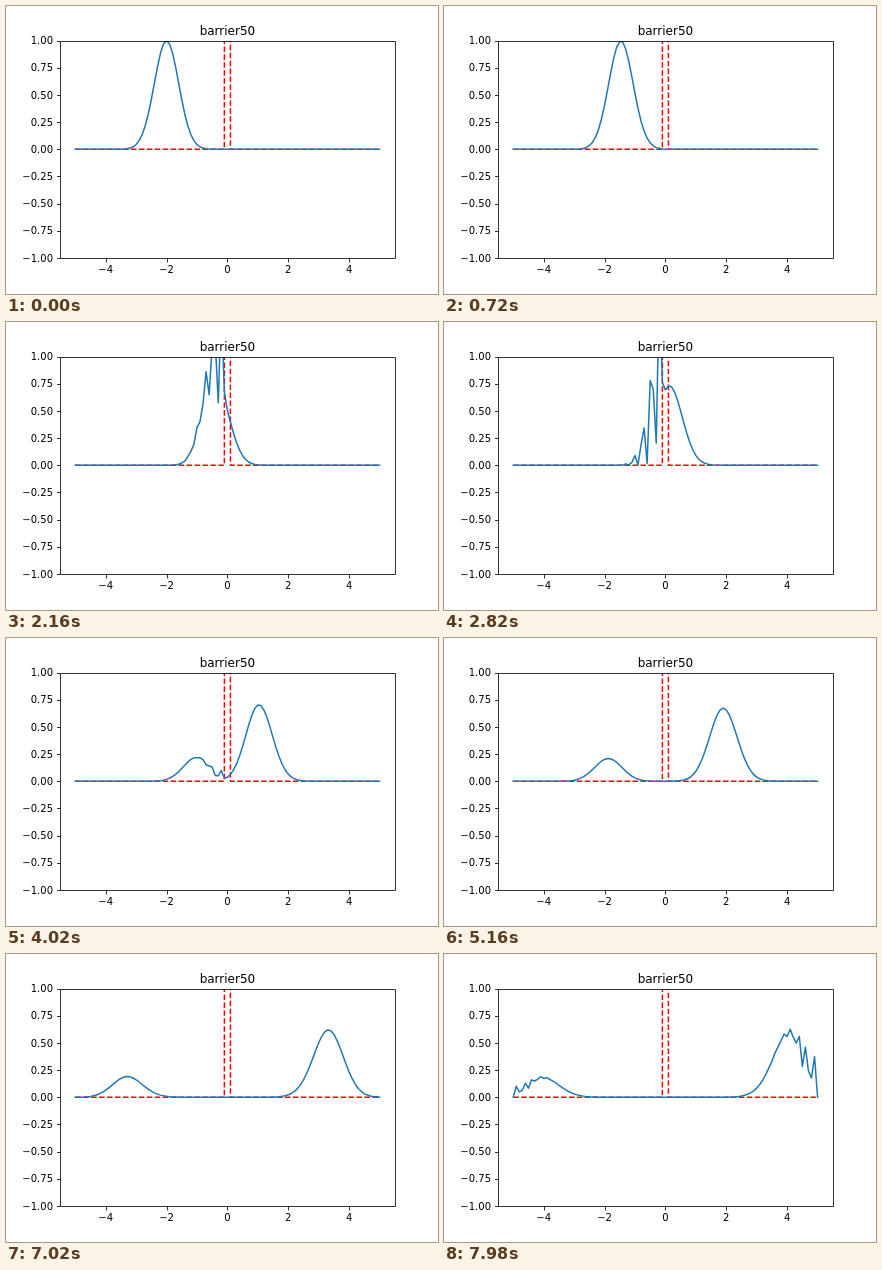
Animation, 432 px wide and 288 px high, one loop 8 s. Source, as an HTML page:

```html
<!DOCTYPE html>
<html lang="en">
<head>
<meta charset="utf-8">
<title>Wave packet and barrier</title>
<style>
  html, body { margin: 0; width: 100%; height: 100%; overflow: hidden; background: #fff; }
  svg { display: block; width: 100%; height: 100%; }
  text { font: 10px "DejaVu Sans", sans-serif; fill: #000; }
  .title { font-size: 12px; }
  .axis { fill: none; stroke: #000; stroke-width: .8; }
  .line { fill: none; stroke-width: 1.5; stroke-linejoin: round; }
</style>
</head>
<body>
<svg viewBox="0 0 432 288">
  <clipPath id="plot"><rect x="54" y="35" width="335" height="217"/></clipPath>
  <g clip-path="url(#plot)">
    <path id="barrier" class="line" stroke="#f00" stroke-dasharray="5.55 2.4"/>
    <path id="density" class="line" stroke="#1f77b4" stroke-linecap="square"/>
  </g>
  <path id="axes" class="axis"/>
  <g id="labels"></g>
</svg>
<script>
const LOOP = 8000, STEP = 60;
const POINTS = 101, DX = 0.1, DT = 0.005, SUBSTEPS = 5;
const START = -2, SIGMA = 0.4, WAVE_NUMBER = 20, HEIGHT = 50;

const $ = id => document.getElementById(id);
const px = x => 221.4 + 30.4364 * x;
const py = y => 143.28 - 108.72 * y;
const snap = v => Math.floor(v + 0.5) + 0.5;
const gridX = i => (i - (POINTS - 1) / 2) * DX;

function addText(x, y, text, anchor, className = '') {
  const node = document.createElementNS('http://www.w3.org/2000/svg', 'text');
  node.setAttribute('x', x);
  node.setAttribute('y', y);
  node.setAttribute('text-anchor', anchor);
  node.setAttribute('class', className);
  node.textContent = text;
  $('labels').append(node);
}

function drawAxes() {
  let path = 'M54.5 35.5H389.5V252.5H54.5Z';
  const label = (v, digits) => v.toFixed(digits).replace('-', '\u2212');
  for (let x = -4; x <= 4; x += 2) {
    path += `M${snap(px(x))} 252.5v4`;
    addText(px(x), 267, label(x, 0), 'middle');
  }
  for (let y = -1; y <= 1; y += 0.25) {
    path += `M54.5 ${snap(py(y))}h-3.5`;
    addText(47, Math.round(py(y) + 3.6), label(y, 2), 'end');
  }
  $('axes').setAttribute('d', path);
  addText(px(0), 29, 'barrier50', 'middle', 'title');
}

// The barrier occupies one grid point, so its sides leave the plot almost vertically.
function drawBarrier() {
  const lean = 0.08, base = py(0);
  $('barrier').setAttribute('d',
    `M${px(-5)} ${base}H${px(-DX)}L${px(-DX) + lean} -1` +
    `M${px(DX) - lean} -1L${px(DX)} ${base}H${px(5)}`);
}

// Schrödinger equation: d(re)/dt = H im, d(im)/dt = -H re, with fixed ends.
function hamiltonian(f, i) {
  const kinetic = (2 * f[i] - f[i - 1] - f[i + 1]) / (2 * DX * DX);
  return kinetic + (i === (POINTS - 1) / 2 ? HEIGHT * f[i] : 0);
}

function slope({ re, im }) {
  const out = { re: new Float64Array(POINTS), im: new Float64Array(POINTS) };
  for (let i = 1; i < POINTS - 1; i++) {
    out.re[i] = hamiltonian(im, i);
    out.im[i] = -hamiltonian(re, i);
  }
  return out;
}

const add = (a, b, h) => ({
  re: a.re.map((v, i) => v + h * b.re[i]),
  im: a.im.map((v, i) => v + h * b.im[i])
});

function rungeKutta(psi, h) {
  const a = slope(psi);
  const b = slope(add(psi, a, h / 2));
  const c = slope(add(psi, b, h / 2));
  const d = slope(add(psi, c, h));
  return add(add(add(add(psi, a, h / 6), b, h / 3), c, h / 3), d, h / 6);
}

function wavePacket() {
  const psi = { re: new Float64Array(POINTS), im: new Float64Array(POINTS) };
  for (let i = 1; i < POINTS - 1; i++) {
    const x = gridX(i);
    const size = Math.exp(-((x - START) ** 2) / (4 * SIGMA * SIGMA));
    psi.re[i] = size * Math.cos(WAVE_NUMBER * x);
    psi.im[i] = size * Math.sin(WAVE_NUMBER * x);
  }
  return psi;
}

function densityPath({ re, im }) {
  const points = Array.from(re, (v, i) =>
    `${px(gridX(i)).toFixed(2)} ${py(v * v + im[i] * im[i]).toFixed(2)}`);
  return 'M' + points.join('L');
}

function simulate() {
  const paths = [];
  let psi = wavePacket();
  for (let n = 0; n < Math.ceil(LOOP / STEP); n++) {
    paths.push(densityPath(psi));
    for (let s = 0; s < SUBSTEPS; s++) psi = rungeKutta(psi, DT / SUBSTEPS);
  }
  return paths;
}

drawAxes();
drawBarrier();
const paths = simulate();
const begin = performance.now();
let shown = -1;

function play() {
  const step = Math.floor(((performance.now() - begin) % LOOP) / STEP);
  if (step !== shown) $('density').setAttribute('d', paths[shown = step]);
  requestAnimationFrame(play);
}
play();
</script>
</body>
</html>
```
